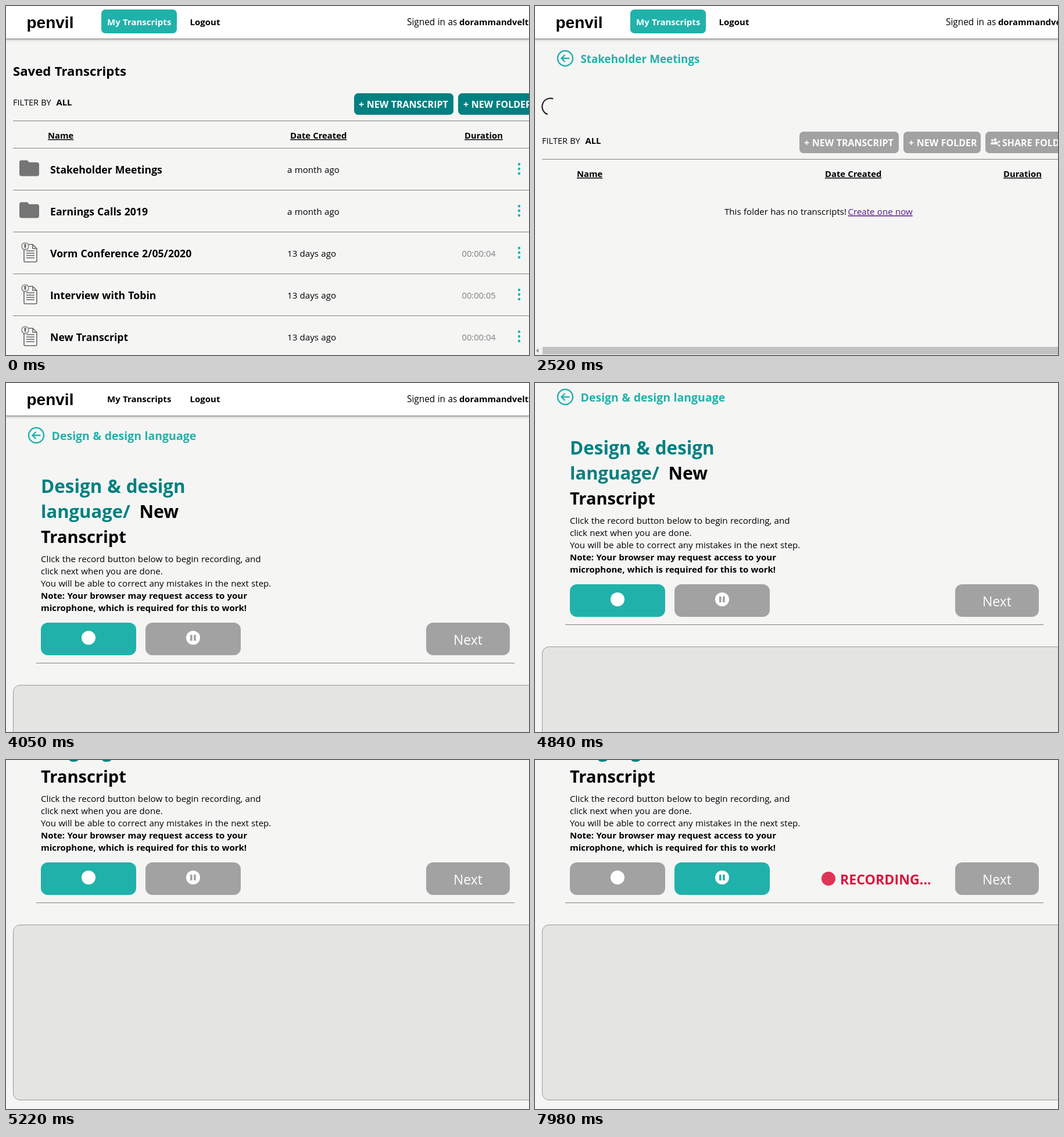
An HTML page that plays this animation: 900 px wide and 600 px high, repeating every 8 s.

```html
<!DOCTYPE html>
<html lang="en">
<head>
<meta charset="utf-8">
<title>Transcripts</title>
<style>
  html, body { margin: 0; width: 100%; height: 100%; overflow: hidden; background: #f5f5f4; }
  svg { display: block; width: 900px; height: 600px; }
  text { font-family: "Open Sans", "Noto Sans", sans-serif; white-space: pre; word-spacing: .025em; }
  .b { font-weight: 700; }
  .u { text-decoration: underline; }
  .w { fill: #fff; }
  .sea { fill: #20b2aa; }
  .teal { fill: #008080; }
  .rule { stroke: #808080; }
  .first { fill: var(--first); }
  .btn { fill: var(--btn); }
  .share { fill: var(--share); }
  .rec { fill: var(--rec); }
  .pause { fill: var(--pause); }
  .line { fill: none; stroke: #666; stroke-width: 1.6; }
</style>
</head>
<body>
<svg id="stage" viewBox="0 0 900 600"></svg>
<script>
const LOOP = 8000;
const GREY = [162, 162, 162], TEAL = [0, 128, 128], SEA = [32, 178, 170];
const stage = document.getElementById('stage');

const text = (x, y, str, size = 15.1, cls = '', extra = '') =>
  `<text x="${x}" y="${y}" font-size="${size}" class="${cls}" ${extra}>${str.replace(/&/g, '&amp;')}</text>`;
const bold = (x, y, str, size = 14.8, cls = '') => text(x, y, str, size, 'b ' + cls);
const box = (x, y, w, h, r, cls) =>
  `<rect x="${x}" y="${y}" width="${w}" height="${h}" rx="${r}" class="${cls}"/>`;
const rule = (y, x1 = 12, x2 = 900) => `<path class="rule" d="M${x1} ${y + .5}H${x2}"/>`;
const group = (id, body) => `<g id="${id}">${body}</g>`;

const folderIcon = y => `<path transform="translate(19.6 ${y - 21.5}) scale(1.7)" fill="#757575"
  d="M10 4H4c-1.1 0-2 .9-2 2v12c0 1.1.9 2 2 2h16c1.1 0 2-.9 2-2V8c0-1.1-.9-2-2-2h-8l-2-2z"/>`;

const fileIcon = y => `<g class="line" transform="translate(0 ${y})">
  <path d="M31 -5V14Q31 16 33 16H51Q53 16 53 14V-7L46 -14H39M46 -14V-7H53"/>
  <path d="M35 -3H49M35 1H49M35 5H49M35 9H49"/>
  <circle cx="33" cy="-11" r="6" stroke-width="1.2"/>
  <path d="M33 -14V-10" stroke-width="3" stroke-linecap="round"/><path d="M33 -9V-6.5" stroke-width="1"/></g>`;

const peopleIcon = (x, y) => `<g class="w" transform="translate(${x} ${y})">
  <circle cx="3" cy="-4" r="2"/><circle cx="8" cy="-5" r="2.4"/>
  <path d="M0 3Q0 -1 3 -1Q4 -1 5 0Q6 -2 8 -2Q12 -2 12 3Z"/>
  <path d="M10 1L15 5M10 1L15 -2" stroke="#fff" stroke-width="1.5"/>
  <circle cx="15" cy="-2" r="1.6"/><circle cx="15" cy="5" r="1.6"/></g>`;

function row(id, top, i, [name, date, duration]) {
  const y = top + 47 + 72 * i, mid = y + 36;
  const dots = [-8, 0, 8].map(d => `<circle class="sea" cx="883" cy="${mid + d}" r="2.2"/>`).join('');
  return rule(y) + group(id + i,
    (duration ? fileIcon(mid) : folderIcon(mid)) + bold(76, mid + 8, name, 17.7) +
    text(484, mid + 7, date) + (duration ? text(784.5, mid + 7, duration, 14.7, '', 'fill="#808080"') : '') + dots);
}

function table(y, { wide = 0, share = true } = {}) {
  const x = share ? (wide ? 455 : 438) : 599, top = y - 47;
  return text(12, y - 26, 'FILTER BY', 14.6) + bold(86.5, y - 26, 'ALL') +
    box(x, top, 171, 37, 7, 'first') + bold(x + 8, y - 22, '+ NEW TRANSCRIPT', 16, 'w') +
    box(x + 179, top, 133, 37, 7, 'btn') + bold(x + 188, y - 22, '+ NEW FOLDER', 16, 'w') +
    (share ? box(x + 320, top, 160, 37, 7, 'share') + peopleIcon(x + 329, y - 28) +
      bold(x + 349, y - 22, 'SHARE FOLDER', 16, 'w') : '') +
    rule(y) + bold(72, y + 31, 'Name', 14.8, 'u') +
    bold(wide ? 499 : 489, y + 31, 'Date Created', 14.8, 'u') +
    bold(wide ? 806 : 789, y + 31, 'Duration', 14.8, 'u');
}

const back = (name, size) => `<g fill="none" stroke="#20b2aa" stroke-width="2.4">
  <circle cx="52" cy="90" r="13"/><path d="M59.5 90H46M51.5 84L45.5 90L51.5 96"/></g>` +
  bold(78.5, 98, name, size, 'sea');

const nothing = y => text(326, y + 96, 'This folder has no transcripts!') +
  text(538.5, y + 96, 'Create one now', 15.1, 'u', 'fill="#551a8b"');

const scrollbar = `<path fill="#f1f1f1" d="M0 586H900V600H0Z"/><path fill="#c1c1c1" d="M13 586H900V599H13Z"/>
  <path fill="#8a8a8a" d="M6 589V596L2 592.5Z"/>`;

const spinner = `<path class="spin" d="M18 161A13 13 0 0 0 36 183" fill="none" stroke="#222" stroke-width="2.2"/>`;

const waiting = (name, size) => back(name, size) + spinner +
  table(263, { wide: 1 }) + nothing(263) + scrollbar;

const homeRows = [
  ['Stakeholder Meetings', 'a month ago'],
  ['Earnings Calls 2019', 'a month ago'],
  ['Vorm Conference 2/05/2020', '13 days ago', '00:00:04'],
  ['Interview with Tobin', '13 days ago', '00:00:05'],
  ['New Transcript', '13 days ago', '00:00:04']
];
const folderRows = [
  ['Product planning', 'a month ago'],
  ['Design & design language', 'a month ago'],
  ['New Transcript', '13 days ago', '00:00:04'],
  ['New Transcript', '13 days ago', '00:00:05']
];
// Pointer enter and leave times for each row
const homeHover = [[560, 1110], [510, 560], [460, 510], [410, 460], [220, 410]];
const folderHover = [[1730, 1830], [1830, 2520]];

const record =
  back('Design & design language', 19.5) +
  bold(60, 189, 'Design & design', 31.4, 'teal') + bold(60, 232, 'language/', 31, 'teal') +
  bold(229.5, 232, 'New', 30.2) + bold(60, 275, 'Transcript', 29) +
  text(60, 308, 'Click the record button below to begin recording, and', 15.2) +
  text(60, 329, 'click next when you are done.') +
  text(60, 350, 'You will be able to correct any mistakes in the next step.') +
  bold(60, 371, 'Note: Your browser may request access to your', 15) +
  bold(60, 392, 'microphone, which is required for this to work!', 15) +
  box(60, 412, 164, 56, 12, 'rec') + '<circle class="w" cx="142" cy="438" r="12"/>' +
  box(240, 412, 164, 56, 12, 'pause') + '<circle class="w" cx="322" cy="438" r="12"/>' +
  box(317, 433, 3.6, 10, .5, 'pause') + box(323.2, 433, 3.6, 10, .5, 'pause') +
  group('recording', '<circle id="dot" cx="505" cy="440" r="12" fill="#dc143c"/>' +
    text(525, 450, 'RECORDING...', 23.2, 'b', 'fill="#dc143c"')) +
  '<rect x="723" y="412" width="144" height="56" rx="12" fill="#a2a2a2"/>' + text(770, 450, 'Next', 23, 'w') +
  rule(481, 52, 875) +
  '<rect x="12.5" y="519.5" width="940" height="301" rx="11.5" fill="#e4e4e3" stroke="#999"/>';

const header = `<rect width="900" height="57" fill="#fff" filter="url(#shade)"/>${rule(56, 0)}` +
  '<text x="35.5" y="38" font-size="28" style="font-family:\'Liberation Sans\',sans-serif;font-weight:700">penvil</text>' +
  '<rect id="tab" x="164" y="6" width="130" height="41" rx="7" class="sea"/>' +
  '<g id="tabText">' + bold(174, 33, 'My Transcripts', 15) + '</g>' + bold(316.5, 33, 'Logout', 15) +
  group('user', text(690, 33, 'Signed in as', 15.4) + bold(780, 33, 'dorammandvelt', 14.8));

stage.innerHTML = `<defs><filter id="shade" x="-5%" y="-20%" width="110%" height="160%">
  <feDropShadow dx="0" dy="1" stdDeviation="2" flood-opacity=".3"/></filter></defs>
  <rect width="900" height="600" fill="#f5f5f4"/>` + group('page',
  group('home', bold(12, 120, 'Saved Transcripts', 22.2) + table(197, { share: false }) +
    homeRows.map((r, i) => row('home', 197, i, r)).join('')) +
  group('wait1', waiting('Saved Transcripts', 18.5) +
    group('status', '<path fill="#292929" d="M0 580H308Q311 580 311 583V600H0Z"/>' +
      text(1, 595, 'Waiting for hackathon-livenotes.herokuapp.com...', 11.4, '', 'fill="#bdbdbd"'))) +
  group('folder', back('Saved Transcripts', 18.5) + bold(12, 184, 'Stakeholder Meetings', 22.6) + table(261) +
    folderRows.map((r, i) => row('folder', 261, i, r)).join('')) +
  group('wait2', waiting('Stakeholder Meetings', 18.8)) +
  group('empty', back('Stakeholder Meetings', 18.8) + bold(12, 184, 'Design & design language', 23.35) +
    table(261, { wide: 1 }) + nothing(261) + scrollbar) +
  group('record', record) + header);

const $ = id => document.getElementById(id);
const ramp = (t, from, to) => Math.min(1, Math.max(0, (t - from) / (to - from)));
const mix = (a, b, k) => `rgb(${a.map((v, i) => v + (b[i] - v) * k).join()})`;
const setVar = (name, value) => stage.style.setProperty('--' + name, value);
const scenes = [['home', 0], ['wait1', 1110], ['folder', 1480], ['wait2', 2520], ['empty', 2770], ['record', 3980]];

function hover(id, times, t) {
  times.forEach(([enter, leave], i) => {
    $(id + i).style.opacity = 1 - .3 * (ramp(t, enter, enter + 50) - ramp(t, leave, leave + 50));
  });
}

function render(t) {
  const scene = scenes.filter(s => t >= s[1]).pop()[0];
  scenes.forEach(([id]) => { $(id).style.display = id === scene ? '' : 'none'; });
  hover('home', homeHover, t);
  hover('folder', folderHover, t);

  const active = { home: 1, folder: ramp(t, 1490, 1590), empty: ramp(t, 2792, 2890) }[scene] || 0;
  const btn = mix(GREY, TEAL, active);
  setVar('btn', btn);
  setVar('first', t >= 3680 ? mix(TEAL, SEA, ramp(t, 3660, 3730)) : btn);
  setVar('share', scene === 'folder' ? btn : mix(GREY, TEAL, 0));

  $('status').style.display = t >= 1200 && t < 1450 ? '' : 'none';
  document.querySelectorAll('.spin').forEach(s =>
    s.setAttribute('transform', `rotate(${(t - 1360) * .36} 26 172)`));

  const wide = ['wait1', 'wait2', 'empty'].includes(scene);
  $('user').setAttribute('transform', `translate(${wide ? 17 : 0})`);
  const left = ramp(t, 3950, 4050);
  $('tab').style.opacity = 1 - left;
  $('tabText').style.fill = mix([255, 255, 255], [0, 0, 0], left);

  // The wheel scroll advances in even jumps
  const jumps = t < 4740 ? 0 : Math.floor((t - 4740) / 48) + 1;
  $('page').setAttribute('transform', `translate(0 ${-Math.min(236, 22 * jumps)})`);

  const started = ramp(t, 6450, 6570);
  setVar('rec', t < 6450 ? mix(SEA, TEAL, ramp(t, 5760, 5820)) : mix(TEAL, GREY, started));
  setVar('pause', mix(GREY, SEA, started));
  $('recording').style.opacity = started;
  $('dot').style.opacity = t < 7460 ? 1 : t < 7740 ? .95 : t < 7980 ? .9 : .86;
}

const start = performance.now();
function tick() {
  render((performance.now() - start) % LOOP);
  requestAnimationFrame(tick);
}
tick();
</script>
</body>
</html>
```
